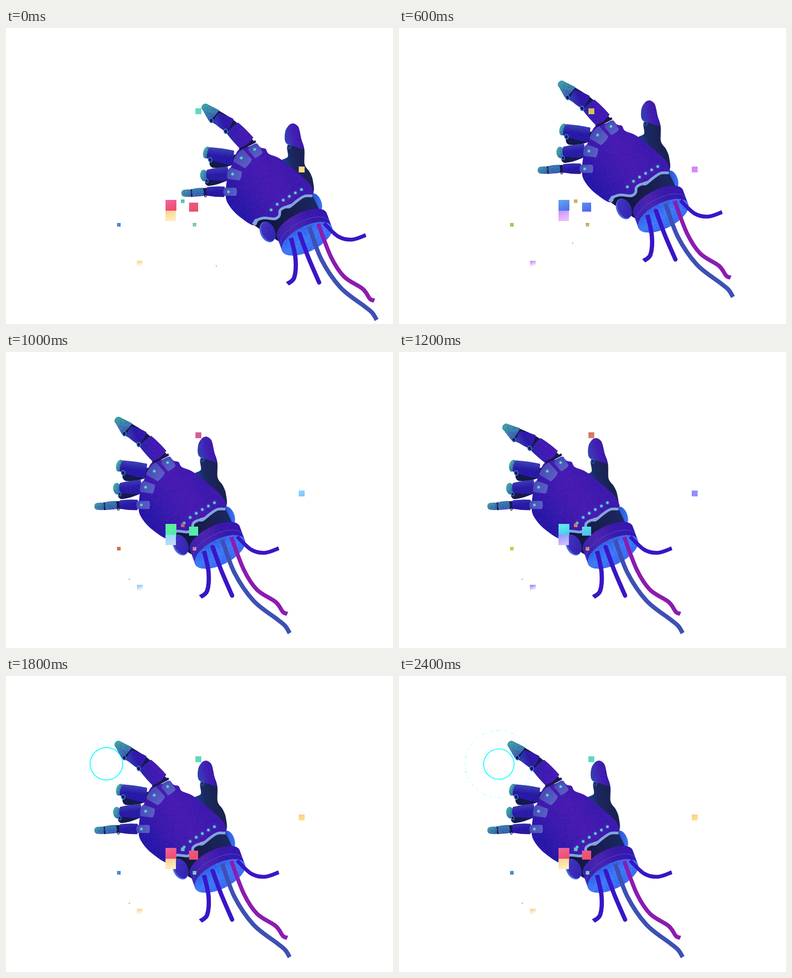
Animation of 854 by 656 pixels, one loop 2.6 s. Source, as an HTML page with a canvas:

```html
<!DOCTYPE html>
<html lang="en">
<head>
<meta charset="utf-8">
<title>Robot hand</title>
<style>
html, body { margin: 0; width: 100%; height: 100%; overflow: hidden; background: #fff; }
canvas { display: block; }
</style>
</head>
<body>
<canvas id="stage" width="854" height="656"></canvas>
<script>
const ctx = document.getElementById('stage').getContext('2d');
const LOOP = 2600, STEP = 200, LAST = 11;
const NAVY = '#141a4c', TRIM = '#7fa5db';
const TILT = -27 * Math.PI / 180;

// The hand flies in over the first steps, then stays.
const FLIGHT = [[0, 0], [-40, -24], [-81, -51], [-141, -37], [-192, -24]];
const HUES = [0, -122, -122, -193, -193, -155, -108, -108, 0];

let seed = 7;
function random() {
  seed = (seed * 16807) % 2147483647;
  return seed / 2147483647;
}

function makeGrain(light, dark, strength) {
  const tile = document.createElement('canvas');
  tile.width = tile.height = 128;
  const g = tile.getContext('2d');
  for (let i = 0; i < 128 * 128; i++) {
    g.globalAlpha = random() * strength;
    g.fillStyle = random() < 0.5 ? light : dark;
    g.fillRect(i % 128, Math.floor(i / 128), 1, 1);
  }
  return ctx.createPattern(tile, 'repeat');
}
const soft = makeGrain('#5a4ad0', '#200c98', 0.25);
const teal = makeGrain('#45c8b0', '#26389c', 0.42);
const spray = makeGrain('#5c9cff', '#2450e8', 0.5);

// Smooth path through "x,y x,y ..."
function curve(text, closed = true, tension = 0.15) {
  const p = text.split(' ').map(s => s.split(',').map(Number));
  const n = p.length;
  const at = i => closed ? p[(i + n) % n] : p[Math.max(0, Math.min(n - 1, i))];
  const path = new Path2D();
  path.moveTo(...p[0]);
  for (let i = 0; i < (closed ? n : n - 1); i++) {
    const [a, b, c, d] = [at(i - 1), at(i), at(i + 1), at(i + 2)];
    path.bezierCurveTo(
      b[0] + (c[0] - a[0]) * tension, b[1] + (c[1] - a[1]) * tension,
      c[0] - (d[0] - b[0]) * tension, c[1] - (d[1] - b[1]) * tension, c[0], c[1]);
  }
  if (closed) path.closePath();
  return path;
}
const line = text => curve(text, false, 1 / 6);

// Tapered piece from a to b, with widths at both ends, a round cap and swollen sides
function piece(a, b, wa, wb, cap = 3, swell = 2) {
  const len = Math.hypot(b[0] - a[0], b[1] - a[1]);
  const ux = (b[0] - a[0]) / len, uy = (b[1] - a[1]) / len;
  const at = (s, n) => [a[0] + ux * s - uy * n, a[1] + uy * s + ux * n];
  const mid = (wa + wb) / 4 + swell;
  const path = new Path2D();
  path.moveTo(...at(0, -wa / 2));
  path.quadraticCurveTo(...at(len / 2, -mid), ...at(len, -wb / 2));
  path.quadraticCurveTo(...at(len + 3, 0), ...at(len, wb / 2));
  path.quadraticCurveTo(...at(len / 2, mid), ...at(0, wa / 2));
  path.bezierCurveTo(...at(-cap, wa / 2), ...at(-cap, -wa / 2), ...at(0, -wa / 2));
  return path;
}

function oval(x, y, rx, ry, deg = 0) {
  const path = new Path2D();
  path.ellipse(x, y, rx, ry, deg * Math.PI / 180, 0, Math.PI * 2);
  return path;
}

function shade(x0, y0, x1, y1, ...colors) {
  const g = ctx.createLinearGradient(x0, y0, x1, y1);
  colors.forEach((c, i) => g.addColorStop(i / (colors.length - 1), c));
  return g;
}

function fill(path, paint, grain) {
  ctx.fillStyle = paint;
  ctx.fill(path);
  if (grain) {
    ctx.fillStyle = grain;
    ctx.fill(path);
  }
}

function stroke(path, color, width, cap = 'butt') {
  ctx.strokeStyle = color;
  ctx.lineWidth = width;
  ctx.lineCap = cap;
  ctx.stroke(path);
}

function joint(x, y, r = 5) {
  const ring = oval(x, y, r * 0.8, r, -15);
  fill(ring, NAVY);
  stroke(ring, '#3f78cf', r * 0.4);
}

function light(x, y) {
  const g = ctx.createRadialGradient(x, y, 0, x, y, 6);
  g.addColorStop(0, 'rgba(75,190,215,.8)');
  g.addColorStop(1, 'rgba(75,130,215,0)');
  fill(oval(x, y, 6, 6), g);
  fill(oval(x, y, 2.6, 2.6), '#58dfc8');
}

function turned(x, y, deg, draw) {
  ctx.save();
  ctx.translate(x, y);
  ctx.rotate(deg * Math.PI / 180);
  ctx.translate(-x, -y);
  draw();
  ctx.restore();
}

const thumbBase = curve('622,260 622,285 607,298 640,340 677,364 677,337 670,319 659,302 656,262');
const thumbTip = curve('615,245 617,227 626,214 636,212 646,221 652,247 657,262 655,268 635,262 619,256');
const palm = curve('512,271 536,263 552,256 562,265 573,268 580,279 605,290 644,321 665,340 676,356 ' +
  '676,372 640,386 609,399 600,418 559,423 545,437 514,417 495,397 485,375 488,334 498,304');
const wrist = curve('548,437 560,423 600,420 609,400 640,386 657,374 676,372 692,406 650,425 607,474 585,462', true, 0.04);
const trim = line('548,436 554,426 570,421 593,423 603,416 605,404 616,397 626,396 641,384 658,373 676,372');

function drawThumb() {
  fill(thumbBase, shade(608, 300, 655, 290, '#15459a', '#1b2860', '#1a2254'));
  fill(thumbTip, shade(615, 246, 654, 238, '#3048b4', '#4420b4', '#3a14a4'), soft);
  stroke(oval(625, 262, 3.5, 5, -10), '#2c64bc', 1.6);
}

function drawIndex() {
  stroke(line('459,194 497,219 536,261'), NAVY, 30);
  fill(piece([440, 176], [459, 194], 17, 33, 11, 0), shade(444, 168, 454, 199, '#3fa6a4', '#3f83ad', '#3c5ab4'), teal);
  fill(piece([464, 199], [494, 216], 24, 33), shade(461, 211, 496, 199, '#3040b4', '#2c16a4', '#3517ad'), soft);
  fill(piece([500, 222], [532, 256], 35, 38), shade(493, 240, 541, 234, '#3022a8', '#4219b4', '#4a18b0'), soft);
  joint(453, 205);
  joint(485, 229);
}

function drawFingers() {
  stroke(line('459,300 480,299 514,288'), NAVY, 20, 'round');
  fill(oval(443, 276, 8, 13.5, 14), shade(435, 276, 446, 281, '#4fbaaa', '#315da6'), teal);
  fill(piece([448, 277], [500, 288], 26, 33, 5), shade(468, 263, 464, 304, '#4050b8', '#2518a4', '#2416ac'), soft);
  joint(450.5, 292);

  stroke(line('448,341 463,338 495,326'), NAVY, 18, 'round');
  fill(oval(437, 327, 8.5, 13, -8), shade(430, 320, 443, 326, '#48b4a8', '#3470ac'), teal);
  fill(piece([445, 325], [490, 323], 22, 31, 4), shade(463, 308, 466, 341, '#4044b4', '#281aa8', '#281a9c'), soft);
  joint(443, 339, 4);

  stroke(line('407,366 440,363 488,363'), NAVY, 17);
  stroke(oval(440, 371, 2.4, 3.5), NAVY, 1.3);
  fill(piece([393, 366], [407, 366], 15, 16, 8, 1), shade(390, 361, 404, 375, '#46a0a9', '#355bae'), teal);
  fill(piece([412, 365], [435, 363], 17, 18, 2, 1), shade(422, 355, 425, 374, '#3a7db0', '#3c4eb4'), teal);
  fill(piece([444, 362], [482, 363], 19, 23), shade(458, 349, 462, 376, '#3837b0', '#2517a6', '#281494'), soft);
}

function drawKnuckle(a, b, wa, wb) {
  const at = k => [a[0] + (b[0] - a[0]) * k, a[1] + (b[1] - a[1]) * k];
  fill(piece(a, b, wa, wb, 6, 0), shade(...a, ...b, '#4d4bb9', '#595fc3'));
  light(...at(0.28));
}

function drawPalm() {
  fill(palm, shade(500, 385, 617, 304, '#2415a6', '#3c18ad', '#4a19b1', '#3e17ad'), soft);
  stroke(line('515,269 530,262 551,251'), NAVY, 5);
  drawKnuckle([545, 264], [558, 282], 25, 21);
  drawKnuckle([513, 283], [535, 301], 34, 25);
  drawKnuckle([493, 322], [518, 328], 26, 20);
  drawKnuckle([484, 363], [508, 363], 18, 18);
}

function drawCuff() {
  const band = new Path2D();
  band.ellipse(653, 437, 61, 27, TILT, Math.PI, Math.PI * 2);
  band.ellipse(664, 467, 61, 28, TILT, 0, Math.PI);
  band.closePath();
  fill(band, shade(601, 468, 712, 416, '#3b20ad', '#5023ad', '#3c16a8', '#3515b2'), soft);
  const rim = new Path2D();
  rim.ellipse(660, 455, 60, 27, TILT, Math.PI, Math.PI * 2);
  stroke(rim, '#3b43d3', 1.4);
  fill(oval(664, 467, 61, 28, -27), shade(644, 445, 677, 494, '#2c5be4', '#3d7afa', '#3567f4'), spray);
}

function drawWrist() {
  fill(oval(685, 387, 11, 21, -20), shade(676, 384, 699, 382, '#294fc8', '#4178fc'));
  fill(wrist, shade(563, 435, 681, 386, '#101440', '#171d4d', '#1b2760'));
  stroke(trim, TRIM, 6);
  fill(curve('543,434 550,423 558,423 552,437', true, 0.05), TRIM);
  for (let u = 0; u < 1.1; u += 0.2) light(585 + 67 * u, 403 - 45 * u ** 0.8);
  drawCuff();
  fill(oval(577, 452, 16, 24, -24), '#4866df');
  fill(oval(578.5, 451, 14, 22.5, -24), shade(566, 445, 592, 453, '#4034bd', '#3523b4'), soft);
}

function drawWires() {
  stroke(line('629,465 639,512 636,553 621,567'), '#3916c6', 9.5);
  stroke(line('648,456 667,508 691,564'), '#3916c6', 9.5, 'round');
  stroke(line('669,440 696,513 738,575 790,616 808,631 818,647'), '#3e50b4', 9.5);
  stroke(line('689,434 717,507 746,551 787,578 803,600 813,604'), '#8c1caf', 9);
  stroke(line('702,433 733,462 763,469 794,459'), '#3916c6', 8.5);
}

function drawHand(x, y, bend) {
  ctx.save();
  ctx.translate(x, y);
  turned(756, 472, -3 * bend, drawThumb);
  turned(546, 268, -15.5 * bend, drawIndex);
  drawFingers();
  drawPalm();
  drawWrist();
  drawWires();
  ctx.fillStyle = '#222';
  ctx.fillRect(463, 527, 2, 1);
  ctx.restore();
}

// x, y, size, hue, saturation, lightness at the top and at the bottom
const SQUARES = [
  [418, 178, 13, 162, 60, 61, 61],
  [646, 307, 13, 32, 100, 77, 77],
  [352, 381, 24, 335, 82, 67, 62],
  [352, 405, 23, 34, 96, 78, 87],
  [404, 387, 20, 340, 80, 64, 62],
  [386, 380, 8, 170, 45, 54, 58],
  [412, 432, 8, 155, 40, 60, 68],
  [245, 432, 8, 204, 62, 55, 56],
  [289, 516, 13, 40, 88, 72, 99]
];

function drawSquares(turn) {
  const hsl = (h, s, l) => `hsl(${(h + turn + 360) % 360} ${s}% ${l}%)`;
  for (const [x, y, size, h, s, top, bottom] of SQUARES) {
    ctx.fillStyle = shade(x, y, x + size * 0.35, y + size, hsl(h, s, top), hsl(h + 12, s, bottom));
    ctx.fillRect(x, y, size, size);
  }
}

function drawRings(step) {
  if (step < 6) return;
  if (step < LAST) {
    const r = Math.min(36, 9 + 14 * (step - 6));
    stroke(oval(221.5, 194.5, r, r), '#0ff', 1.8);
    return;
  }
  stroke(oval(220.3, 195.3, 33.6, 33.6), '#0ff', 1.8);
  ctx.setLineDash([3, 4, 1, 5, 6, 4, 2, 8]);
  stroke(oval(219.5, 195, 74, 74), 'rgba(0,255,255,.65)', 1);
  ctx.setLineDash([]);
}

function frame(time) {
  const step = Math.max(0, Math.floor(time % LOOP / STEP) - 1);
  const [x, y] = FLIGHT[Math.min(step, FLIGHT.length - 1)];
  const bend = Math.max(0, 1 - Math.abs(step - 6) / 2);
  ctx.fillStyle = '#fff';
  ctx.fillRect(0, 0, 854, 656);
  drawRings(step);
  drawHand(x, y, bend);
  drawSquares(HUES[Math.min(step, HUES.length - 1)]);
}

const start = performance.now();
function tick() {
  frame(performance.now() - start);
  requestAnimationFrame(tick);
}
tick();
</script>
</body>
</html>
```
